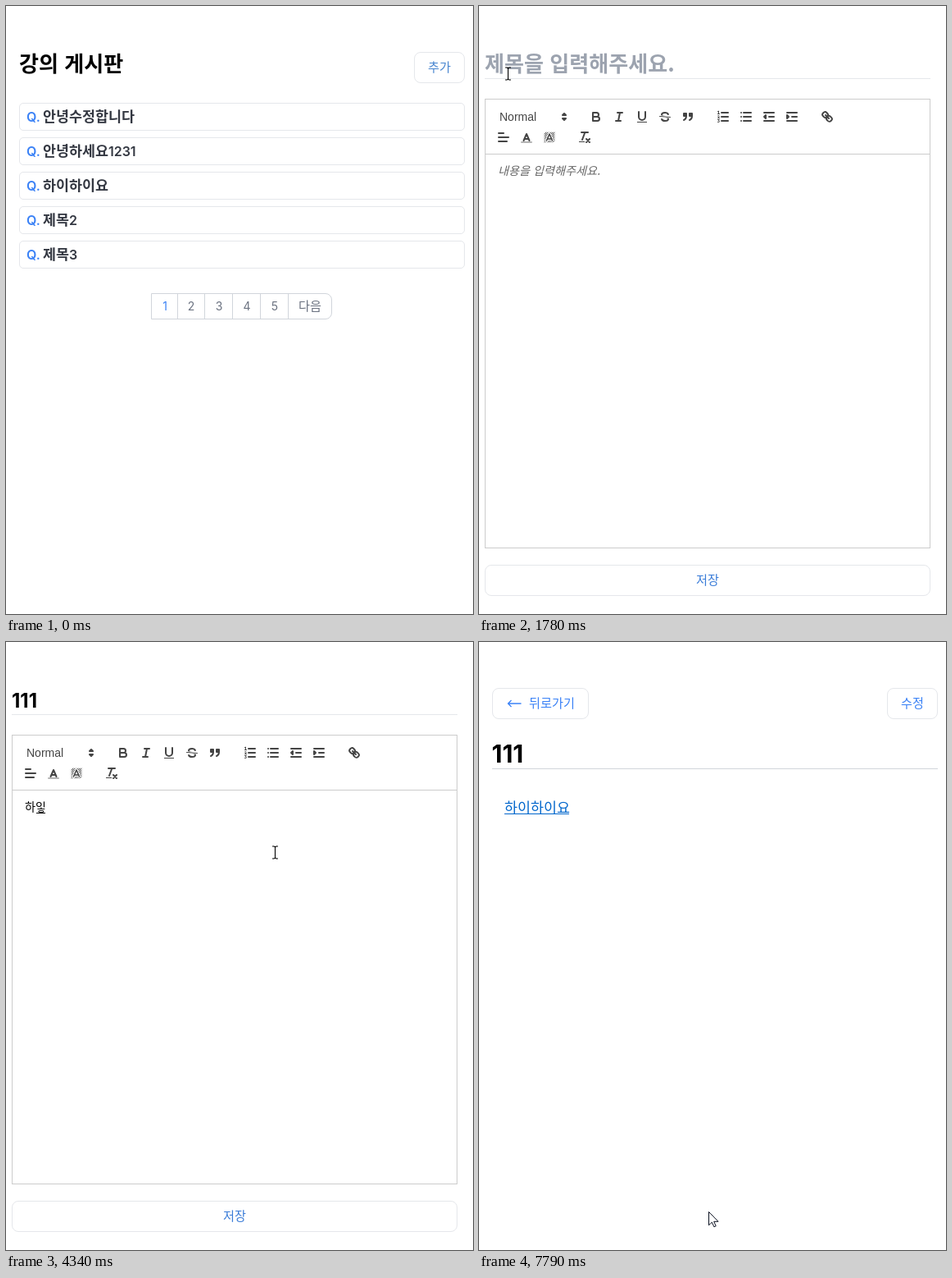
Write an HTML page that moves like this. It is 570 px wide and 741 px high and loops after 8 s.

```html
<!DOCTYPE html>
<html lang="ko">
<head>
<meta charset="utf-8">
<title>강의 게시판</title>
<style>
html, body { margin: 0; width: 100%; height: 100%; overflow: hidden; background: #fff; }
svg { display: block; }
text { font-family: Inter, sans-serif; white-space: pre; }
.ko { font-family: "Noto Sans CJK KR", "Noto Sans KR", "Noto Sans CJK JP", sans-serif; }
.thin .ko { font-weight: 350; }
.arial { font-family: "Liberation Sans", Arial, sans-serif; }
.icon { fill: none; stroke: #444; stroke-width: 2; stroke-linecap: round; stroke-linejoin: round; }
.icon .fill { fill: #444; }
.icon .solid { fill: #444; stroke: none; }
.icon .slim { stroke-width: 1; }
</style>
</head>
<body>
<svg id="stage" width="570" height="741" viewBox="0 0 570 741"></svg>
<script>
const LOOP = 8000;
const BLUE = '#3b82f6', PALE = '#e5e7eb', GRAY = '#d1d5db';
const stage = document.getElementById('stage');

// Hangul syllables are one em wide here, so the Korean face is set a little larger.
const runs = (str, size) => str.replace(/[ㄱ-ㅎ가-힣][ㄱ-ㅎ가-힣 .]*/g,
  run => `<tspan class="ko" font-size="${size * 1.087}">${run}</tspan>`);

function text(x, y, str, size, fill, weight = 400, extra = '') {
  const cls = weight < 500 ? 'class="thin"' : '';
  return `<text x="${x}" y="${y}" font-size="${size}" fill="${fill}" font-weight="${weight}" ${cls} ${extra}>${runs(str, size)}</text>`;
}

const box = (x, y, w, h, r, stroke, extra = '') =>
  `<rect x="${x + .5}" y="${y + .5}" width="${w - 1}" height="${h - 1}" rx="${r}" fill="#fff" stroke="${stroke}" ${extra}/>`;
const bar = (x, y, w, h, fill, extra = '') =>
  `<rect x="${x}" y="${y}" width="${w}" height="${h}" fill="${fill}" ${extra}/>`;
const group = (id, body) => `<g id="${id}">${body}</g>`;

// ---- list page ----
function listPage() {
  const titles = ['안녕수정합니다', '안녕하세요1231', '하이하이요', '제목2', '제목3'];
  const rows = titles.map((title, i) => {
    const y = 118 + 42 * i;
    return box(16, y, 544, 34, 4.5, PALE) +
      text(25, y + 23, 'Q.', 16, BLUE, 600) +
      text(45, y + 23, title, 16, '#343842', 600);
  }).join('');
  const pages = [194, 226, 260, 294, 328].map((x, i) =>
    text(x, 371, String(i + 1), 14, i ? '#6b7280' : BLUE, 400, 'text-anchor="middle"')).join('');
  const pager = `<path d="M177.5 350.5H390a7.5 7.5 0 0 1 7.5 7.5V374a7.5 7.5 0 0 1-7.5 7.5H177.5Z" fill="#fff" stroke="${GRAY}"/>` +
    [209, 242, 276, 310, 344].map(x => bar(x, 350, 1, 32, GRAY)).join('');
  return text(16, 79.5, '강의 게시판', 24, '#000', 700) +
    box(498, 56, 62, 38, 7.5, PALE, 'id="addBox"') +
    text(515, 80, '추가', 14, '#4a87d0') +
    rows + pager + pages + text(357, 371, '다음', 14, '#6b7280');
}

// ---- toolbar icons, each on an 18 by 18 grid ----
const path = (d, cls = '') => `<path d="${d}" class="${cls}"/>`;

function hatch() {
  let d = '';
  for (let k = 8; k < 30; k += 2) {
    const a = Math.max(3, k - 15);
    d += `M${a} ${k - a}L${k - a} ${a}`;
  }
  const letter = 'M5.5 13L9 5L12.5 13M6.4 11H11.6';
  return path(d, 'slim') + `<path d="${letter}" stroke="#fff" stroke-width="3.5"/>` +
    `<path d="${letter}" stroke-width="1.6"/>`;
}

const icons = [
  [95, 126, path('M7 11L9 13L11 11ZM7 7L9 5L11 7Z', 'fill')],
  [134, 126, path('M5 4H9.5a2.5 2.5 0 0 1 0 5H5ZM5 9h5.5a2.5 2.5 0 0 1 0 5H5Z')],
  [162, 126, path('M7 4H13M5 14H11M8 14L10 4')],
  [190, 126, path('M5 3V9a4 4 0 0 0 8 0V3') + path('M3 15h12v1H3Z', 'solid')],
  [218, 126, path('M12.9 6C12.4 4.8 10.9 4 9 4C6.8 4 5 5 5 6.5C5 8 6.2 8.6 9 9C11.8 9.4 13 10 13 11.5C13 13 11.2 14 9 14C7.1 14 5.6 13.2 5.1 12') +
    `<path d="M2.5 8.5L15.5 9.5" stroke="#fff" stroke-width="2.4"/>` + path('M2.5 8.5L15.5 9.5', 'slim')],
  [246, 126, path('M4 5h3v3H4ZM11 5h3v3h-3ZM7 8c0 4-3 5-3 5M14 8c0 4-3 5-3 5', 'fill')],
  [289, 126, path('M7 4H15M7 9H15M7 14H15') +
    path('M2.5 2.5L3.5 2V5.5M2.5 5.5H4.5M2.5 8Q4.4 7 4.3 8.5L2.5 10.5H4.5M2.5 12.5H4.4L3.4 13.8Q4.8 14 4.3 15.2Q3.6 16 2.4 15.4', 'slim')],
  [317, 126, path('M6 4H15M6 9H15M6 14H15M3 4h.01M3 9h.01M3 14h.01')],
  [345, 126, path('M3 4H15M9 9H15M3 14H15') + path('M5 7V11L3 9Z', 'fill')],
  [373, 126, path('M3 4H15M9 9H15M3 14H15') + path('M3 7V11L5 9Z', 'fill')],
  [416, 126, path('M7 7L11 11M8.9 4.6a3.5 3.5 0 0 1 .4 4.7a3.5 3.5 0 0 1-4.7-.4C3.2 7.5 2 6.4 4.2 4.2S7.5 3.2 8.9 4.6ZM13.4 9.1a3.5 3.5 0 0 0-4.7-.4a3.5 3.5 0 0 0 .4 4.7c1.4 1.4 2.5 2.5 4.7.4S14.8 10.5 13.4 9.1Z')],
  [21, 151, path('M3 9H15M3 14H13M3 4H9')],
  [49, 151, `<path d="M3 15H15" stroke-opacity=".4"/>` + path('M5.5 13L9 5L12.5 13M6.4 11H11.6')],
  [77, 151, hatch()],
  [120, 151, path('M5 3H13M6 12L9.35 3') + path('M11 11L15 15M15 11L11 15') + path('M2 14h7v1H2Z', 'solid')],
];

// ---- editor page ----
function squiggle() {
  let d = 'M23 209';
  for (let x = 23; x < 88; x += 4) d += 'q1 -2.4 2 0t2 0';
  return `<path id="squiggle" d="${d}" fill="none" stroke="#f04040" stroke-width="1.2"/>`;
}

function editPage() {
  return group('titleHint', text(7, 79.5, '제목을 입력해주세요.', 24, '#9ca3af', 700)) +
    text(7, 80, '', 24, '#000', 700, 'id="titleText"') +
    bar(7, 88, 544, 1, PALE) +
    bar(7, 57, 1, 30, '#000', 'id="titleCaret"') +
    group('editor',
      box(7, 113, 544, 548, 0, '#ccc') + bar(7, 180, 544, 1, '#ccc') +
      '<text x="25" y="140" font-size="14" fill="#444" class="arial">Normal</text>' +
      icons.map(([x, y, art]) => `<g class="icon" transform="translate(${x} ${y})">${art}</g>`).join('') +
      group('bodyHint', text(23, 205.5, '내용을 입력해주세요.', 13, '#666', 400, 'font-style="italic"')) +
      text(23, 205.5, '', 13, '#000', 400, 'id="bodyText"') +
      squiggle() +
      bar(76, 208, 11, 1, '#000', 'id="compose"') +
      bar(23, 194, 1, 15, '#000', 'id="bodyCaret"')) +
    box(7, 681, 544, 38, 7.5, PALE, 'id="saveBox"') +
    text(265, 705, '저장', 14, '#3b7dd8');
}

// ---- post page ----
function postPage() {
  return box(16, 56, 118, 38, 7.5, PALE) + box(498, 56, 62, 38, 7.5, PALE) +
    `<path d="M51.5 75H35.5M39.5 71L35.5 75L39.5 79" fill="none" stroke="${BLUE}" stroke-width="1.3"/>` +
    text(61, 80, '뒤로가기', 14, BLUE) + text(515, 80, '수정', 14, BLUE) +
    text(15.5, 147, '111', 30, '#000', 700) +
    bar(16, 154, 544, 1, GRAY) +
    text(31, 208, '하이하이요', 16, '#06c') + bar(31, 209, 79, 1, '#06c');
}

// ---- pointers, hot spot at the origin ----
const beam = 'M-3.5 -7.5H-1.2L0 -6.6L1.2 -7.5H3.5M0 -6.6V6.6M-3.5 7.5H-1.2L0 6.6L1.2 7.5H3.5';
const pointers =
  group('beam', `<path d="${beam}" transform="translate(.5 .5)" fill="none" stroke="#000" stroke-width="1.1"/>`) +
  group('arrow', '<path d="M.5 .5V16.8L4.3 13.2L6.9 18.8L9.2 17.8L6.7 12.3H12Z" fill="#fff" stroke="#0a1020"/>') +
  group('hand', '<path d="M-1.5 12V2.2a1.9 1.9 0 0 1 3.8 0V8q2-1 2.9.8q2-.8 2.8.9q1.9-.2 1.9 2V16q0 3-1.9 5v2.5H-.5V21L-6 14.5q-1.2-2.4 1-2.7q1 0 3.5 2.6Z" fill="#fff" stroke="#000" stroke-width="1.1" stroke-linejoin="round"/>' +
    '<path d="M2.4 8V13M5.3 9V13M8 10V13" stroke="#000" stroke-width=".8"/>');

stage.innerHTML = group('list', listPage()) + group('edit', editPage()) +
  group('post', postPage()) + group('pointer', pointers);

const el = id => document.getElementById(id);
const show = (id, on) => el(id).setAttribute('display', on ? 'inline' : 'none');

// Time, x, y and shape of the pointer; linear in between.
const moves = [
  [0, 500, 750, 'arrow'], [70, 502, 738, 'arrow'], [250, 512, 380, 'arrow'], [420, 525, 130, 'arrow'],
  [480, 529, 72, 'hand'], [810, 529, 72, 'arrow'], [870, 529, 72, 'arrow'], [940, 410, 92, 'arrow'],
  [1010, 231, 103, 'arrow'], [1080, 242, 82, 'beam'], [1160, 248, 72, 'beam'], [1370, 248, 72, 'beam'],
  [1500, 200, 76, 'beam'], [1640, 85, 74, 'beam'], [1780, 35, 82, 'beam'], [1920, 35, 82, 'beam'],
  [2110, 150, 87, 'beam'], [2240, 243, 85, 'beam'], [3130, 243, 85, 'beam'], [3190, 262, 130, 'beam'],
  [3260, 295, 205, 'beam'], [3330, 322, 255, 'beam'], [3400, 327, 263, 'beam'], [3470, 331, 265, 'beam'],
  [3540, 328, 256, 'beam'], [5480, 328, 256, 'beam'], [5620, 410, 330, 'beam'], [5780, 488, 450, 'beam'],
  [5980, 430, 580, 'beam'], [6120, 340, 650, 'arrow'], [6250, 281, 682, 'arrow'], [6300, 280, 688, 'hand'],
  [6440, 284, 696, 'hand'], [6590, 282, 694, 'hand'], [7790, 280, 694, 'arrow'], [8000, 280, 694, 'arrow'],
];

// Time, text and caret position of the title field.
const titleSteps = [[0, '', 7], [2710, '1', 18], [2910, '11', 30], [3040, '111', 42]];
const keys = ['ㅎ', '하', '항', '하이', '하잏', '하이하', '하이항', '하이하이'];
const bodySteps = [[0, ''], ...keys.map((s, i) => [4000 + i * 78, s]), [4880, '하이하잉'], [4950, '하이하이요']];

const current = (steps, t) => steps.findLast(s => s[0] <= t);
const within = (t, a, b) => t >= a && t < b;

function setText(id, str, size) {
  const node = el(id);
  if (node.dataset.value === str) return;
  node.dataset.value = str;
  node.innerHTML = runs(str, size);
}

function drawPointer(t) {
  const i = Math.min(moves.findLastIndex(m => m[0] <= t), moves.length - 2);
  const [t0, x0, y0, shape] = moves[i], [t1, x1, y1] = moves[i + 1];
  const held = t0 === 6590;
  const p = held ? 0 : (t - t0) / (t1 - t0);
  const x = Math.round(x0 + (x1 - x0) * p), y = Math.round(y0 + (y1 - y0) * p);
  el('pointer').setAttribute('transform', `translate(${x} ${y})`);
  for (const id of ['beam', 'arrow', 'hand']) show(id, id === shape);
}

function draw(t) {
  show('list', t < 740);
  show('edit', within(t, 740, 7720));
  show('post', t >= 7720);
  show('editor', t >= 940);
  el('addBox').setAttribute('fill', t >= 470 ? '#f3f4f6' : '#fff');
  el('saveBox').setAttribute('fill', t >= 6300 ? '#f3f4f6' : '#fff');

  const [, title, caretX] = current(titleSteps, t);
  setText('titleText', title, 24);
  show('titleHint', !title);
  el('titleCaret').setAttribute('x', caretX);
  show('titleCaret', within(t, 1080, 1640) || within(t, 2440, 3540));

  const [, body] = current(bodySteps, t);
  setText('bodyText', body, 13);
  show('bodyHint', !body);
  show('bodyCaret', within(t, 3540, 4000));
  el('compose').setAttribute('x', 24 + 13 * (body.length - 1));
  show('compose', body && t < 7040);
  show('squiggle', within(t, 5900, 7040));
  drawPointer(t);
}

const start = performance.now();
function tick() {
  draw((performance.now() - start) % LOOP);
  requestAnimationFrame(tick);
}
tick();
</script>
</body>
</html>
```
